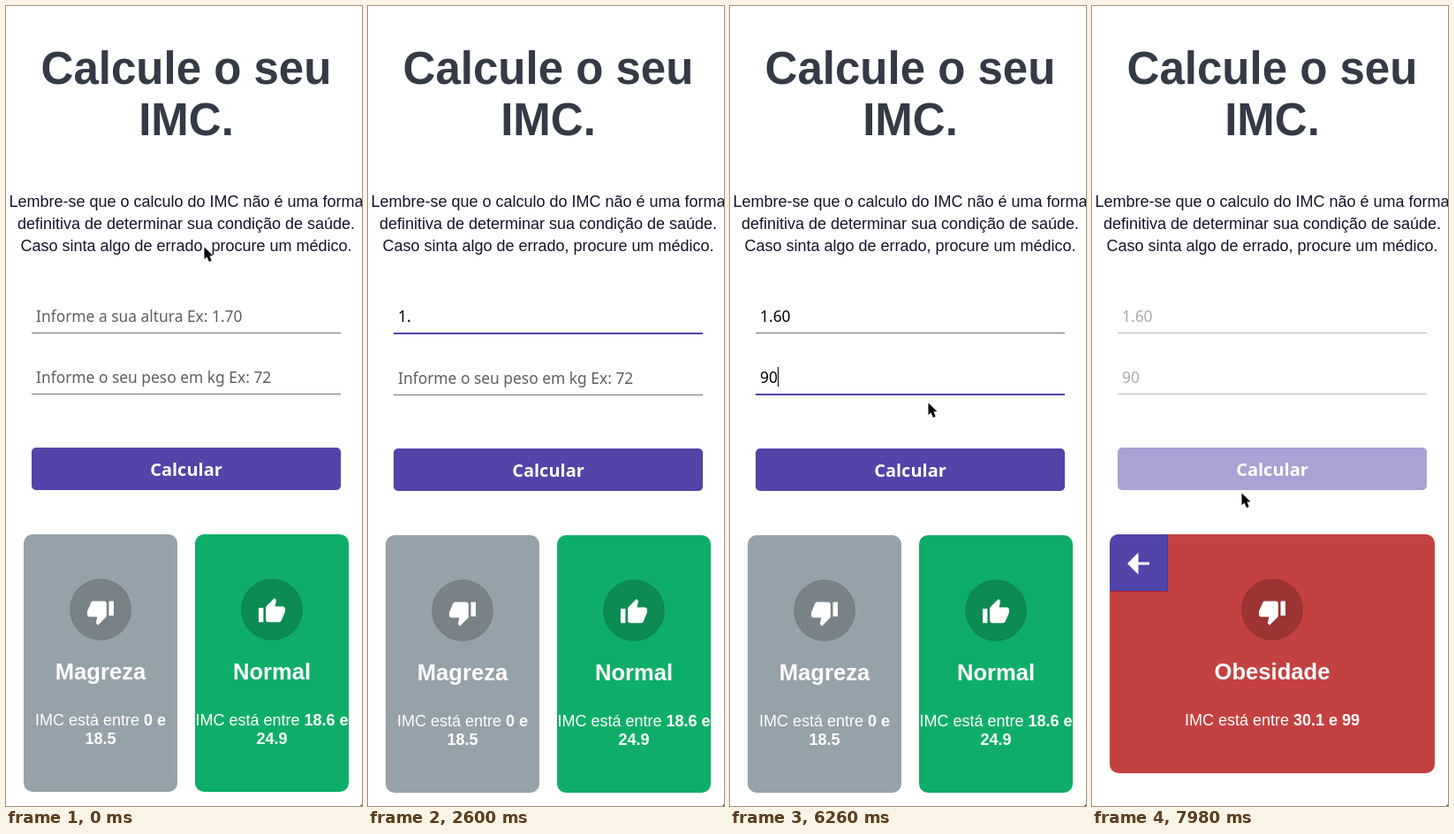
Write an HTML page that moves like this. It is 403x904 px and loops after 8 s.

```html
<!DOCTYPE html>
<html lang="pt-BR">
<head>
<meta charset="utf-8">
<title>Calcule o seu IMC</title>
<style>
html, body { margin: 0; width: 100%; height: 100%; overflow: hidden; background: #fff; }
svg { display: block; width: 100%; height: 100%; }
text { font-family: "Liberation Sans", Arial, sans-serif; font-size: 18px; fill: #fff; }
b, .bold { font-weight: 700; }
.mid { text-anchor: middle; }
.heading { font-size: 51px; font-weight: 700; fill: #343a46; }
.note { fill: #14142b; }
.title { font-size: 25.6px; font-weight: 700; }
.field { font-family: "Noto Sans", "Open Sans", sans-serif; font-size: 17.4px; }
.hint { fill: #5f5f63; }
.value { fill: #000; }
.action { font-family: "Noto Sans", "Open Sans", sans-serif; font-size: 20px; font-weight: 700; }
.badge { fill: #000; fill-opacity: .2; stroke: #000; stroke-opacity: .12; }

/* Every animation shares one 8 s loop: 1% = 80 ms */
[class*="a-"] { animation: 8s linear infinite; }
.a-step { animation-timing-function: step-end; }

.hint1 { animation-name: hint1; }
.hint2 { animation-name: hint2; }
@keyframes hint1 { 0% { opacity: 1 } 24.75%, 100% { opacity: 0 } }
@keyframes hint2 { 0% { opacity: 1 } 60.75%, 100% { opacity: 0 } }

.h1 { animation-name: h1; }
.h2 { animation-name: h2; }
.h3 { animation-name: h3; }
.h4 { animation-name: h4; }
.w1 { animation-name: w1; }
.w2 { animation-name: w2; }
@keyframes h1 { 0% { fill-opacity: 0 } 24.75%, 100% { fill-opacity: 1 } }
@keyframes h2 { 0% { fill-opacity: 0 } 27.75%, 100% { fill-opacity: 1 } }
@keyframes h3 { 0% { fill-opacity: 0 } 34%, 100% { fill-opacity: 1 } }
@keyframes h4 { 0% { fill-opacity: 0 } 35.5%, 100% { fill-opacity: 1 } }
@keyframes w1 { 0% { fill-opacity: 0 } 60.75%, 100% { fill-opacity: 1 } }
@keyframes w2 { 0% { fill-opacity: 0 } 64.25%, 100% { fill-opacity: 1 } }

.caret1 { animation-name: caret1; }
.caret2 { animation-name: caret2; }
@keyframes caret1 {
  0% { opacity: 0; transform: none }
  12.125% { opacity: 1; transform: none }
  19.125% { opacity: 0; transform: none }
  25.8% { opacity: 1; transform: translateX(10px) }
  27.75% { opacity: 1; transform: translateX(15px) }
  32.5% { opacity: 0; transform: translateX(15px) }
  39.625% { opacity: 1; transform: translateX(35px) }
  45.9%, 100% { opacity: 0; transform: none }
}
@keyframes caret2 {
  0% { opacity: 0; transform: none }
  49.5% { opacity: 1; transform: none }
  56.625% { opacity: 0; transform: none }
  63.625% { opacity: 1; transform: translateX(10px) }
  64.25% { opacity: 1; transform: translateX(20px) }
  70.5% { opacity: 0; transform: translateX(20px) }
  77.2% { opacity: 1; transform: translateX(20px) }
  83.9%, 100% { opacity: 0; transform: none }
}

/* A focused field thickens its underline and pushes what follows down 1px */
.line1 { animation-name: tint1, thick1; }
.line2 { animation-name: tint2, thick2; }
.line1, .line2 { animation-duration: 8s; animation-timing-function: linear, step-end; }
@keyframes tint1 { 0%, 12.125% { fill: #6f7276 } 15%, 49% { fill: #5244a8 } 50.4%, 100% { fill: #6f7276 } }
@keyframes tint2 { 0%, 50.3% { fill: #6f7276 } 52.5%, 86.5% { fill: #5244a8 } 90%, 100% { fill: #6f7276 } }
@keyframes thick1 { 0% { height: 1px } 15% { height: 2px } 49.5%, 100% { height: 1px } }
@keyframes thick2 { 0% { height: 1px } 52.5% { height: 2px } 86%, 100% { height: 1px } }
.push1 { animation-name: push1; }
.push2 { animation-name: push2; }
@keyframes push1 { 0% { transform: none } 15% { transform: translateY(1px) } 49.5%, 100% { transform: none } }
@keyframes push2 { 0% { transform: none } 52.5% { transform: translateY(1px) } 86%, 100% { transform: none } }

.form { animation-name: disable; }
.value { animation-name: grey; }
@keyframes disable { 0% { opacity: 1 } 86.5% { opacity: 1; animation-timing-function: ease } 90%, 100% { opacity: .5 } }
@keyframes grey { 0%, 86.5% { fill: #000 } 90%, 100% { fill: #545454 } }

.cards { animation-name: leave; }
.result { animation-name: enter; }
@keyframes leave { 0% { opacity: 1 } 86.5%, 100% { opacity: 0 } }
@keyframes enter { 0% { opacity: 0 } 86.5%, 100% { opacity: 1 } }

.pointer { animation-name: move, seen; }
.pointer { animation-timing-function: ease-in-out, step-end; }
@keyframes move {
  0%, .75% { transform: translate(224px, 272px) }
  10.75%, 43.75% { transform: translate(224px, 352px) }
  48.75%, 74.625% { transform: translate(195px, 425px) }
  78.25% { transform: translate(224px, 448px) }
  84.25%, 90% { transform: translate(238px, 525px) }
  97.625% { transform: translate(225px, 525px) }
  99.75%, 100% { transform: translate(169px, 550px) }
}
@keyframes seen {
  0% { opacity: 1 } 11.375% { opacity: 0 }
  43.75% { opacity: 1 } 49.5% { opacity: 0 }
  74.625% { opacity: 1 } 84.875% { opacity: 0 }
  97.625%, 100% { opacity: 1 }
}

.ring1 { animation-name: ring1; }
.ring2 { animation-name: ring2; }
.ring3 { animation-name: ring3; }
@keyframes ring1 { 0%, 11.37% { opacity: 0 } 11.375%, 12.6% { opacity: 1 } 15%, 100% { opacity: 0 } }
@keyframes ring2 { 0%, 49.49% { opacity: 0 } 49.5%, 50.9% { opacity: 1 } 52.5%, 100% { opacity: 0 } }
@keyframes ring3 { 0%, 84.87% { opacity: 0 } 84.875%, 85.5% { opacity: 1 } 87% { opacity: .45 } 90%, 100% { opacity: 0 } }
</style>
</head>
<body>
<svg viewBox="0 0 403 904" preserveAspectRatio="xMinYMin">
  <defs>
    <radialGradient id="glow">
      <stop offset="0" stop-color="#aaa" stop-opacity=".14"/>
      <stop offset=".7" stop-color="#a0a0a0" stop-opacity=".28"/>
      <stop offset="1" stop-color="#999" stop-opacity=".42"/>
    </radialGradient>
    <path id="down" fill="#fff" transform="translate(-16.4 -13.6) scale(1.364)" d="M15 3H6c-.83 0-1.54.5-1.84 1.22l-3.02 7.05c-.09.23-.14.47-.14.73v2c0 1.1.9 2 2 2h6.31l-.95 4.57-.03.32c0 .41.17.79.44 1.06L9.83 23l6.59-6.59c.36-.36.58-.86.58-1.41V5c0-1.1-.9-2-2-2zm4 0v12h4V3z"/>
    <path id="up" fill="#fff" transform="translate(-16.4 -14.4) scale(1.364)" d="M1 21h4V9H1zm22-11c0-1.1-.9-2-2-2h-6.31l.95-4.57.03-.32c0-.41-.17-.79-.44-1.06L14.17 1 7.59 7.59C7.22 7.95 7 8.45 7 9v10c0 1.1.9 2 2 2h9c.83 0 1.54-.5 1.84-1.22l3.02-7.05c.09-.23.14-.47.14-.73z"/>
  </defs>

  <g class="mid">
    <text class="heading" x="204" y="87.500">Calcule o seu</text>
    <text class="heading" x="204" y="146">IMC.</text>
    <text class="note" x="204" y="227">Lembre-se que o calculo do IMC não é uma forma</text>
    <text class="note" x="204" y="252">definitiva de determinar sua condição de saúde.</text>
    <text class="note" x="204" y="277">Caso sinta algo de errado, procure um médico.</text>
  </g>

  <g class="a-fade form">
    <text class="field hint a-step hint1" x="34" y="357">Informe a sua altura Ex: 1.70</text>
    <text class="field value a-fade" x="34" y="357"><tspan class="a-step h1">1</tspan><tspan class="a-step h2">.</tspan><tspan class="a-step h3">6</tspan><tspan class="a-step h4">0</tspan></text>
    <rect class="a-step caret1" x="34" y="339" width="1" height="22"/>
    <rect class="a-fade line1" x="29" y="369" width="350" height="1"/>
    <g class="a-step push1">
      <text class="field hint a-step hint2" x="34" y="426">Informe o seu peso em kg Ex: 72</text>
      <text class="field value a-fade" x="34" y="426"><tspan class="a-step w1">9</tspan><tspan class="a-step w2">0</tspan></text>
      <rect class="a-step caret2" x="34" y="408" width="1" height="22"/>
      <rect class="a-fade line2" x="29" y="438" width="350" height="1"/>
      <g class="a-step push2">
        <rect x="29" y="499" width="350" height="48" rx="5" fill="#5244a8"/>
        <text class="action mid" x="204" y="530.500">Calcular</text>
      </g>
    </g>
  </g>

  <g class="a-step cards">
    <g class="a-step push1">
      <g class="a-step push2 mid">
        <rect x="20" y="597" width="174" height="291" rx="10" fill="#96a2a9"/>
        <circle class="badge" cx="107" cy="682" r="34.500"/>
        <use href="#down" x="107" y="682"/>
        <text class="title" x="107" y="761">Magreza</text>
        <text x="107" y="813">IMC está entre <tspan class="bold">0 e</tspan></text>
        <text class="bold" x="107" y="834">18.5</text>

        <rect x="214" y="597" width="174" height="291" rx="10" fill="#0fae68"/>
        <circle class="badge" cx="301" cy="682" r="34.500"/>
        <use href="#up" x="301" y="682"/>
        <text class="title" x="301" y="761">Normal</text>
        <text x="301" y="813">IMC está entre <tspan class="bold">18.6 e</tspan></text>
        <text class="bold" x="301" y="834">24.9</text>
      </g>
    </g>
  </g>

  <g class="a-step result mid">
    <rect x="20" y="597" width="368" height="270" rx="10" fill="#c34140"/>
    <path d="M20 662V607a10 10 0 0 1 10-10H86V662z" fill="#5244a8"/>
    <path d="M85.500 598V661" stroke="#2d43b4"/>
    <path d="M20 661.500H86" stroke="#b0202c"/>
    <path d="M40 630L52.500 617.500V628.500H65V631.500H52.500V642.500z" fill="#fff"/>
    <circle class="badge" cx="204" cy="682" r="34.500"/>
    <use href="#down" x="204" y="682"/>
    <text class="title" x="204" y="761">Obesidade</text>
    <text x="204" y="813">IMC está entre <tspan class="bold">30.1 e 99</tspan></text>
  </g>

  <g fill="url(#glow)">
    <circle class="a-fade ring1" cx="224" cy="352" r="27"/>
    <circle class="a-fade ring2" cx="195" cy="424" r="27"/>
    <circle class="a-fade ring3" cx="238" cy="525" r="27"/>
  </g>

  <path class="a-fade pointer" d="M.5.5V14L3.500 11.500 6 17 8.700 15.800 6.500 10.300H10.500z" fill="#05050f" stroke="#fff" stroke-width=".8" paint-order="stroke"/>
  <path d="M403 902V904H401z" fill="#333"/>
</svg>
</body>
</html>
```
